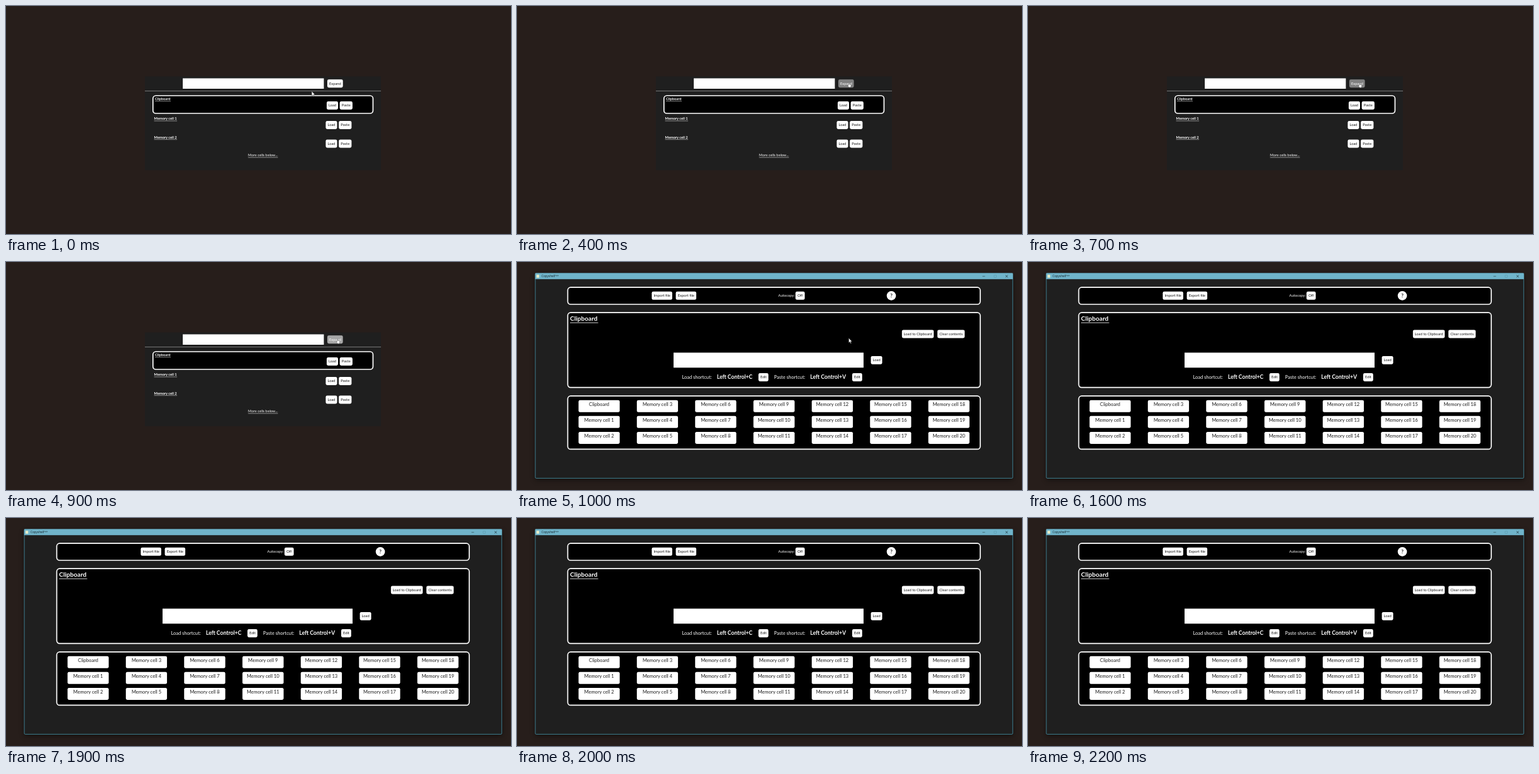
These frames come from a looping animation (800 by 361 pixels, 2.4 s). An HTML page:

```html
<!DOCTYPE html>
<html lang="en">
<head>
<meta charset="utf-8">
<title>Clipboard manager</title>
<style>
  html, body { margin: 0; width: 100%; height: 100%; overflow: hidden; background: #271e1b; }
  svg { display: block; width: 100vw; height: 100vh; }
  text { font-family: Lato, sans-serif; }
</style>
</head>
<body>
<svg id="stage" viewBox="0 0 800 361">
  <defs>
    <filter id="soft" x="-5%" y="-5%" width="110%" height="115%">
      <feGaussianBlur stdDeviation="4"/>
    </filter>
  </defs>
  <g id="compact"></g>
  <g id="full"></g>
  <path id="arrow" d="M0 0V7.2L1.7 5.7L2.9 8.3L4 7.8L2.8 5.3H5Z" fill="#fff" stroke="#222" stroke-width=".4"/>
  <path id="hand" d="M1 .5Q1.7 -.2 2.1 .6V2.7L4.6 3.3Q5.3 3.6 5.2 4.5L4.6 7.6H1.8L-.1 4.9Q-.2 4.1 .6 4.2L1 4.6Z" fill="#fff" stroke="#333" stroke-width=".4"/>
</svg>
<script>
const NS = 'http://www.w3.org/2000/svg';
const $ = id => document.getElementById(id);
const compact = $('compact'), full = $('full');

function add(parent, tag, attrs, label) {
  const el = document.createElementNS(NS, tag);
  for (const k in attrs) el.setAttribute(k, attrs[k]);
  if (label) el.textContent = label;
  parent.appendChild(el);
  return el;
}

const rect = (g, x, y, width, height, fill, extra) =>
  add(g, 'rect', { x, y, width, height, fill, ...extra });

const line = (g, x1, x2, y, stroke = '#ddd', w = 0.6) =>
  add(g, 'path', { d: `M${x1} ${y}H${x2}`, stroke, 'stroke-width': w });

const text = (g, x, y, label, size, extra) =>
  add(g, 'text', { x, y, 'font-size': size, fill: '#fff', ...extra }, label);

const centred = { 'text-anchor': 'middle' };
const bold = { 'font-weight': 700 };

function button(g, x, y, w, label, h = 13, size = 5.8, drop = 8.3) {
  const box = rect(g, x, y, w, h, '#fff', { rx: 2.4 });
  const caption = text(g, x + w / 2, y + drop, label, size, { ...centred, fill: '#1c1c1c' });
  return { box, caption };
}

const panel = (g, x, y, w, h) =>
  rect(g, x, y, w, h, '#000', { rx: 4.5, stroke: '#fff', 'stroke-width': 1.7 });

// Compact panel
rect(compact, 220, 111.5, 374, 148.5, '#1f1f1f');
rect(compact, 280, 114.5, 223.5, 16.5, '#fff');
const expand = button(compact, 509, 116.2, 24.7, 'Expand');
line(compact, 220, 594, 134.6, '#868686', 0.9);
panel(compact, 232.8, 142, 348.6, 28);

[['Clipboard', 236, 149, 25, 508, 151],
 ['Memory cell 1', 234.6, 180.2, 36.4, 506.5, 182],
 ['Memory cell 2', 234.6, 209.6, 36.4, 506.5, 211.4]
].forEach(([label, x, y, w, bx, by]) => {
  text(compact, x, y, label, 5.7, bold);
  line(compact, x, x + w, y + 1.7);
  button(compact, bx, by, 18, 'Load');
  button(compact, bx + 20.7, by, 20.2, 'Paste');
});
text(compact, 407, 238, 'More cells below...', 5.85, centred);
line(compact, 383.5, 430.7, 239.8);

// Full window
rect(full, 29, 21, 756.5, 324, '#000', { opacity: 0.5, filter: 'url(#soft)' });
rect(full, 29, 18, 756.3, 324.4, '#1f1f1f', { rx: 1.5, stroke: '#4797ad', 'stroke-width': 0.8 });
rect(full, 28.8, 17.6, 756.7, 9.6, '#70b4ca');
rect(full, 30.9, 20.2, 4.3, 4.6, '#e6edc9');
text(full, 38.7, 24.2, 'Copyshelf++', 4.8, { fill: '#16252b', 'font-family': 'Open Sans, sans-serif', style: 'font-family:"Open Sans",sans-serif' });
line(full, 737.4, 741.4, 22.7, '#24363d', 0.6);
rect(full, 755.9, 20.9, 3.4, 3.4, 'none', { stroke: '#5795a8', 'stroke-width': 0.5 });
add(full, 'path', { d: 'M773.9 20.8L777.5 24.4M777.5 20.8L773.9 24.4', stroke: '#16252b', 'stroke-width': 0.7 });

panel(full, 80.4, 40.2, 653.4, 26.8);
button(full, 213.5, 46.8, 32.4, 'Import file');
button(full, 251.6, 46.8, 32.4, 'Export file');
text(full, 413.8, 55.1, 'Autocopy:', 5.8);
button(full, 441.2, 46.8, 14.6, 'Off');
add(full, 'circle', { cx: 593, cy: 53.4, r: 7.3, fill: '#fff' });
text(full, 593, 56.3, '?', 8, { ...centred, ...bold, fill: '#1c1c1c' });

panel(full, 80.4, 80.2, 653.4, 118.4);
text(full, 84, 93.2, 'Clipboard', 10.1, bold);
line(full, 84, 128.6, 96.2, '#fff', 0.8);
button(full, 609.8, 107.4, 50.4, 'Load to Clipboard');
button(full, 666, 107.4, 43.2, 'Clear contents');
rect(full, 248, 143.5, 301, 23.8, '#fff');
button(full, 560.6, 148.9, 17.9, 'Load');
text(full, 261.4, 184.8, 'Load shortcut:', 7.5);
text(full, 316.7, 185, 'Left Control+C', 8.6, bold);
button(full, 382.5, 176, 15.8, 'Edit');
text(full, 407.2, 184.8, 'Paste shortcut:', 7.5);
text(full, 464.6, 185, 'Left Control+V', 8.6, bold);
button(full, 531, 176, 15.8, 'Edit');

panel(full, 80.4, 212.2, 653.4, 84.2);
for (let n = 0; n < 21; n++) {
  const x = 97.5 + 92.35 * Math.floor(n / 3), y = 218.8 + 25.05 * (n % 3);
  button(full, x, y, 65.2, n ? 'Memory cell ' + n : 'Clipboard', 19, 7.55, 9.5);
}

// Pointer position per 100 ms step
const toButton = [[484.3, 135], [487, 143.3], [503, 141], [517, 130]];
const acrossWindow = [[525.6, 120.6], [525, 120.4], [522, 119.8], [514, 119], [502.2, 118.6], [386.8, 139]];

function place(el, pos) {
  el.style.display = pos ? '' : 'none';
  if (pos) el.setAttribute('transform', `translate(${pos})`);
}

function draw(ms) {
  const step = Math.floor((ms % 2400) / 100);
  const open = step >= 10, hover = !open && step >= 4, pressed = step === 9;
  compact.style.display = open ? 'none' : '';
  full.style.display = open ? '' : 'none';
  place($('arrow'), open ? acrossWindow[step - 10] : toButton[step]);
  place($('hand'), hover && (step >= 7 ? [523.6, 121.6] : [524, 121.2]));
  expand.box.setAttribute('fill', pressed ? '#a6a6a6' : hover ? '#808080' : '#fff');
  expand.caption.setAttribute('fill', hover ? '#fff' : '#1c1c1c');
}

const start = performance.now();
function tick() {
  draw(performance.now() - start);
  requestAnimationFrame(tick);
}
draw(0);
requestAnimationFrame(tick);
</script>
</body>
</html>
```
